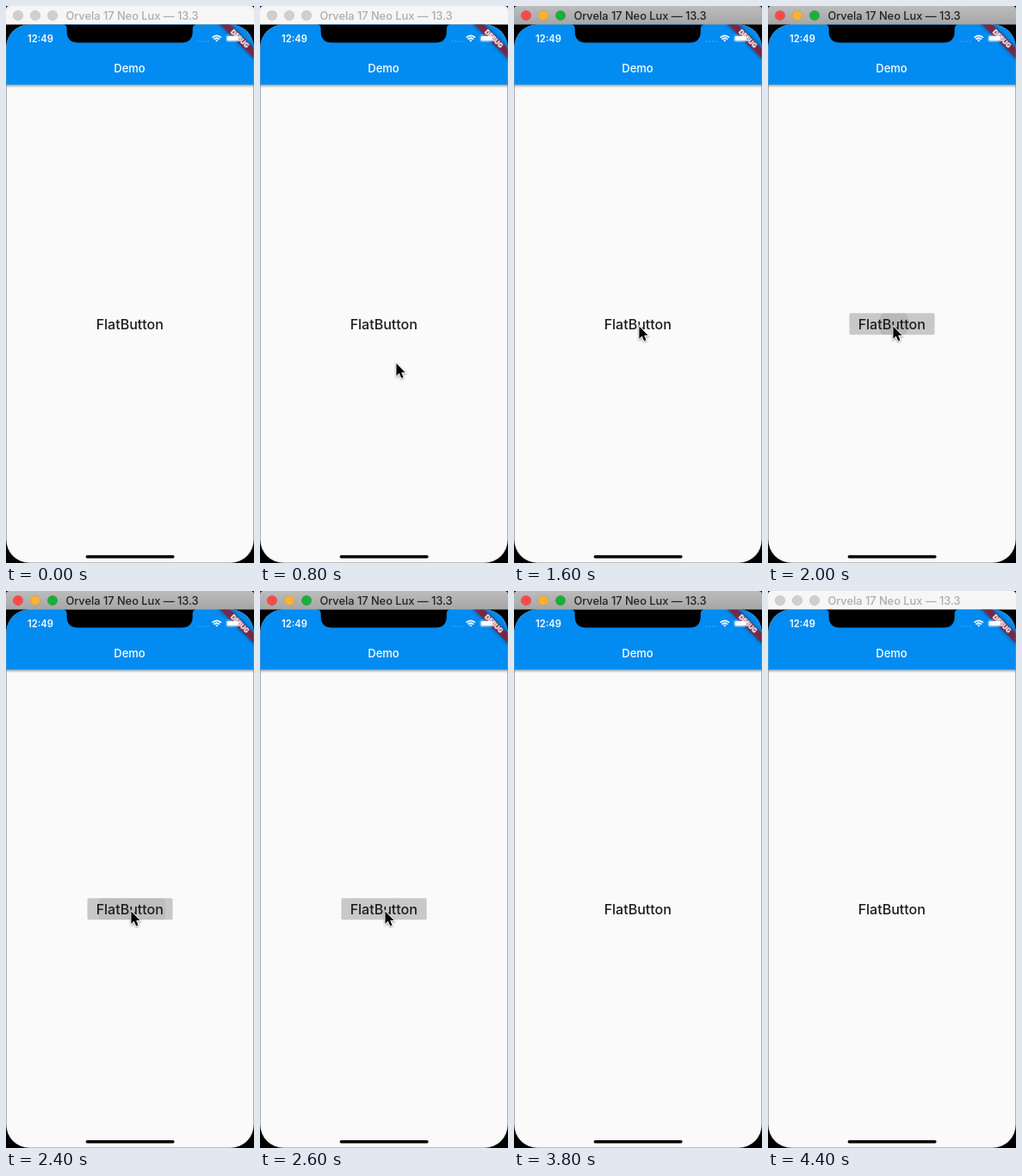
Write an HTML page that moves like this. It is 288 px wide and 646 px high and loops after 4600 ms.

```html
<!DOCTYPE html>
<html lang="en">
<head>
<meta charset="utf-8">
<title>Button demo</title>
<style>
  html, body { margin: 0; width: 100%; height: 100%; overflow: hidden; background: #000; }
  svg { display: block; width: 288px; height: 646px; }
  text { font-family: Inter, Roboto, sans-serif; text-anchor: middle; }
  .lights circle { stroke: rgba(0, 0, 0, .12); stroke-width: .7; fill: #cfcfcf; }
  .title { font-size: 12.8px; font-weight: 500; fill: #adadad; }
  .active .title { fill: #222; }
  .bar { fill: #f6f6f6; }
  .active .bar { fill: url(#metal); }
  .active .red { fill: #fc4948; }
  .active .yellow { fill: #fdb233; }
  .active .green { fill: #17b13a; }
  .ribbon { filter: drop-shadow(0 0 2px rgba(0, 0, 0, .5)); }
  .cursor { filter: drop-shadow(0 1px .8px rgba(0, 0, 0, .4)); }
</style>
</head>
<body>
<svg viewBox="0 0 288 646">
  <defs>
    <linearGradient id="metal" x2="0" y2="1">
      <stop stop-color="#bcbcbc"/><stop offset="1" stop-color="#a6a6a6"/>
    </linearGradient>
    <linearGradient id="shade" x2="0" y2="1">
      <stop stop-opacity=".3"/><stop offset="1" stop-opacity="0"/>
    </linearGradient>
    <clipPath id="screen"><rect x=".3" y="21.4" width="287.4" height="624.4" rx="27"/></clipPath>
    <clipPath id="buttonShape"><rect x="94.5" y="356.3" width="99" height="25" rx="1.5"/></clipPath>
  </defs>

  <rect width="288" height="646"/>
  <g id="window">
    <path class="bar" d="M0 21.4V4Q0 0 4 0H284Q288 0 288 4V21.4Z"/>
    <g class="lights">
      <circle class="red" cx="14" cy="11" r="5.8"/>
      <circle class="yellow" cx="34" cy="11" r="5.8"/>
      <circle class="green" cx="54" cy="11" r="5.8"/>
    </g>
    <text class="title" x="146.5" y="16">Orvela 17 Neo Lux — 13.3</text>
  </g>

  <g clip-path="url(#screen)">
    <rect y="21" width="288" height="625" fill="#fafafa"/>
    <rect y="21" width="288" height="70.4" fill="#028bf0"/>
    <rect y="91.4" width="288" height="3.6" fill="url(#shade)"/>
    <text x="143.5" y="77" font-size="13" font-weight="500" fill="#fff">Demo</text>

    <g id="button" clip-path="url(#buttonShape)">
      <rect x="94" y="356" width="100" height="26" fill="#c8c8c8" id="highlight"/>
      <circle cx="146.2" cy="369" fill="#000" id="splash"/>
    </g>
    <text x="143.7" y="375" font-size="16" font-weight="500" fill="#1c1c1e">FlatButton</text>

    <g class="ribbon" transform="translate(288 21.6) rotate(45)">
      <rect x="-40" y="19.4" width="80" height="8.4" fill="#82243f" fill-opacity=".9"/>
      <text y="26.4" font-size="7.7" font-weight="900" fill="#fff">DEBUG</text>
    </g>

    <path d="M66 21.4Q70.7 21.4 70.7 26.4V29.4Q70.7 42.4 83.7 42.4H203.7Q216.7 42.4 216.7 29.4V26.4Q216.7 21.4 221.7 21.4Z"/>
    <text x="40" y="42" font-size="11.2" font-weight="600" fill="#fff">12:49</text>
    <path d="M222.5 41H236" stroke="#fff" stroke-opacity=".2" stroke-width="1.6" stroke-dasharray="1.8 2"/>
    <g fill="none" stroke="#fff" stroke-width="1.7">
      <path d="M239.5 36.6Q244.7 32 249.9 36.6M241.4 38.7Q244.7 35.8 248 38.7"/>
      <path d="M243 39.8Q244.7 38.6 246.4 39.8L244.7 41.6Z" fill="#fff" stroke="none"/>
    </g>
    <rect x="255.4" y="33.6" width="15.6" height="7.9" rx="2" fill="none" stroke="#fff" stroke-opacity=".45" stroke-width=".7"/>
    <rect x="256.5" y="34.7" width="13.4" height="5.7" rx="1.2" fill="#fff"/>
    <rect x="92.6" y="637" width="103" height="3.5" rx="1.75"/>
  </g>

  <path id="cursor" class="cursor" d="M0 0V14.5L3.3 11.4L5.8 17L8 16L5.8 10.7H10.2Z"
        stroke="#fff" stroke-width="1.8" paint-order="stroke"/>
</svg>
<script>
  const LOOP = 4600, STEP = 200;
  const $ = id => document.getElementById(id);

  // Pointer position from each time onward; null hides it.
  const pointerTrack = [
    [0, null], [400, [212, 610]], [600, [206, 594]], [800, [157, 413]],
    [1000, [150, 396]], [1200, [143, 372]], [1400, [144, 370]],
    [3000, [132, 430]], [3200, [203, 518]], [3400, [241, 543]],
    [3600, [275, 642]], [3800, null]
  ];

  function draw(time) {
    const t = Math.floor(time % LOOP / STEP) * STEP;
    const within = (from, to) => t >= from && t < to;

    $('window').classList.toggle('active', within(1600, 4400));

    const spot = pointerTrack.filter(([from]) => from <= t).pop()[1];
    $('cursor').style.display = spot ? '' : 'none';
    if (spot) $('cursor').setAttribute('transform', `translate(${spot[0] + 1.4} ${spot[1] + 1.4})`);

    // The press highlight fades in while the splash grows at a steady rate.
    $('button').style.display = within(1800, 2800) ? '' : 'none';
    $('highlight').style.opacity = t < 2000 ? .6 : 1;
    $('splash').setAttribute('r', Math.max(0, 18 + (t - 2000) * .0537));
    $('splash').style.opacity = t < 2400 ? .08 : t < 2600 ? .05 : 0;
  }

  const start = performance.now();
  function frame() {
    draw(performance.now() - start);
    requestAnimationFrame(frame);
  }
  frame();
</script>
</body>
</html>
```
